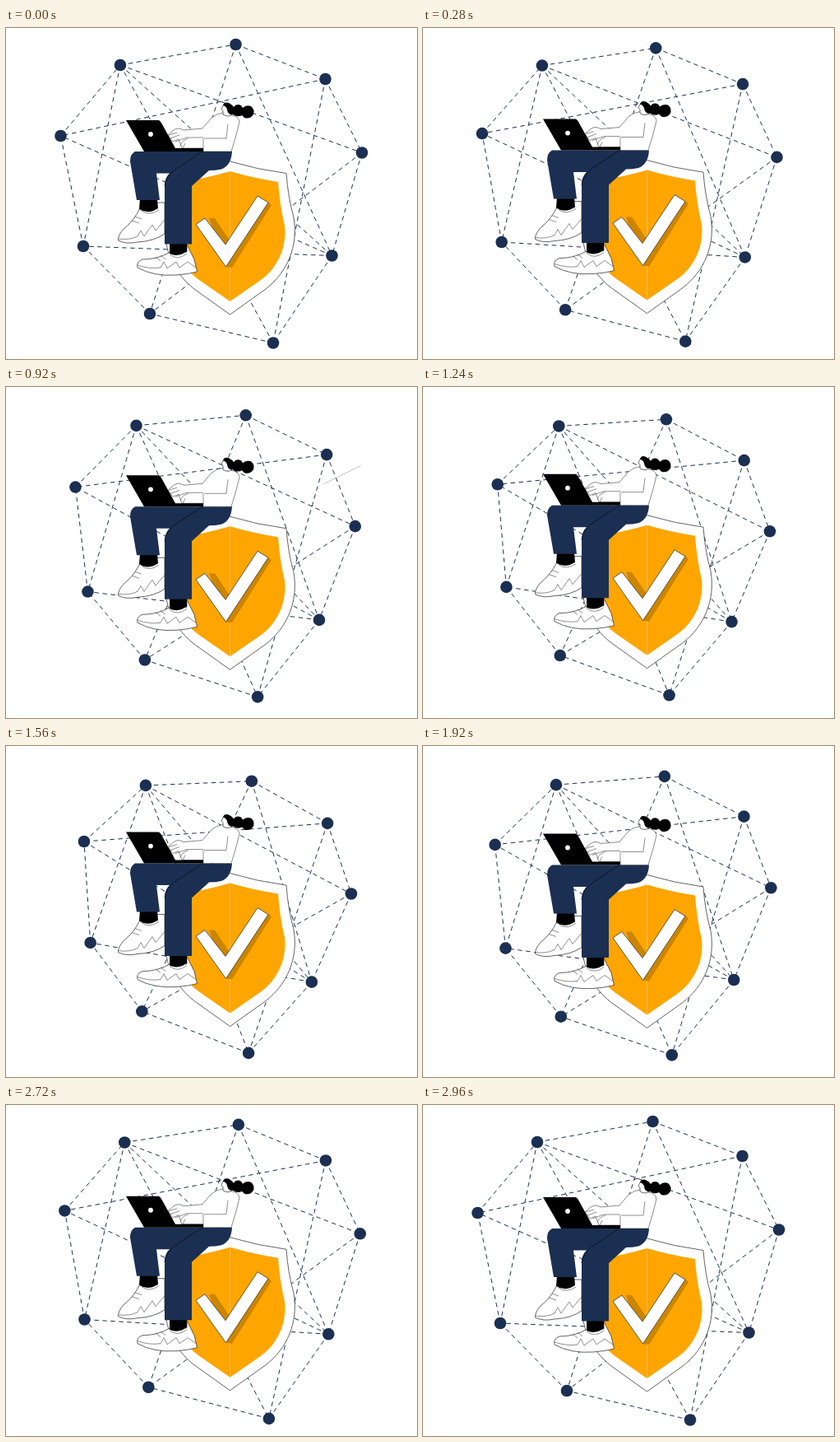
Animation, 500 px wide and 402 px high, one loop 3 s. Source, as an HTML page:

```html
<!DOCTYPE html>
<html lang="en">
<head>
<meta charset="utf-8">
<title>Secure network</title>
<style>
html, body { margin: 0; width: 100%; height: 100%; overflow: hidden; background: #fff; }
svg { display: block; width: 500px; height: 402px; }
.edge { stroke: #1b2f52; stroke-width: 1; stroke-dasharray: 5.5 4.5; }
.node, .navy { fill: #1b2f52; }
.ink { fill: #fff; stroke: #222; stroke-width: .7; stroke-linejoin: round; }
.line { fill: none; stroke: #444; stroke-width: .6; }
.streak { stroke: #aaa; stroke-width: .7; }
</style>
</head>
<body>
<svg viewBox="0 0 500 402">
  <g id="edges"></g>
  <g id="nodes"></g>
  <g id="streaks"></g>
  <g id="figure">
    <!-- shield -->
    <path class="ink" d="M272.500 162Q306 172 341 176.500Q343 205 350 230C356 265 342 297 316 317L272.500 348L229 317C203 297 189 265 195 230Q202 205 204 176.500Q239 172 272.500 162Z"/>
    <path fill="#ffa500" d="M272.500 174Q300 182 331 187Q333 215 339 240C342 265 331 291 310 306L272.500 332L235 306C214 291 203 265 206 240Q212 215 214 187Q245 182 272.500 174Z"/>
    <path d="M272.500 174V332" stroke="#ffc560" stroke-width=".8"/>
    <path fill="#cc8500" d="M247 231L254 231L272 258L319 211L323 215L275 291L267 290Z"/>
    <path class="ink" d="M231 238.500L242 231L267 263L306 204L319 212L267.500 290Z"/>

    <!-- far shoe and sock -->
    <path class="ink" d="M163 219Q155 235 143 244Q136 252 136.500 258Q146 263 160 260Q180 259 193 250V212H184Z"/>
    <path class="line" d="M137 256Q150 258 160 253L164 246L168 253L178 239L182 246L193 233M157 229L165 232M153 234L162 237M165 222Q174 229 186 221"/>
    <path d="M163 207H184L185 219Q173 227 162 220Z"/>

    <!-- near shoe and sock -->
    <path class="ink" d="M198 273Q184 281 166 281Q158 284 160 291Q180 302 207 300Q222 299 232.500 296L229 281L220 263V272Z"/>
    <path class="line" d="M160 288Q175 293 188 291L192 284L196 292L207 284L211 291L221 284L231 291M182 278L188 283M188 276L194 281M199 275Q209 283 220 274"/>
    <path d="M199 260H220V271Q210 279 199 274Z"/>

    <!-- trousers -->
    <path class="navy" d="M157 150H275Q274 167 262 171.500Q255 173 247 173L226 192V262.500H193V189Q194 181 199 176.500H183L187 209H159L151 162Q151 153 157 150Z"/>
    <path d="M239 150L207 171Q195 179 193 192" fill="none" stroke="#0b1527" stroke-width="1"/>

    <!-- torso -->
    <path class="ink" stroke-opacity=".75" d="M264 103Q256 104 250 109L239 122L216 124Q210 120 204 124L197 130L203 138L210 135L214 146L240 146V150H274Q280 132 284 114Q283 107 274 106Z"/>
    <path class="line" d="M241 134H268L270 117M240 134V146M240 133H220L206 138M198 130L208 127M200 134L211 130M212 143Q214 136 222 134M215 146L218 140"/>

    <!-- laptop -->
    <path d="M146 112H186Q188 113 190 117L206 146H240V150H168Z"/>
    <circle cx="176" cy="129" r="2.900" fill="#fff"/>

    <!-- head -->
    <path class="ink" d="M266 91L262 98L264 101V105Q270 109 275 105L273 94Z"/>
    <path d="M264 94Q266 89 271 91Q275 93 277 96Q280 91 286 94L288 97Q292 93 298 95Q303 99 301 105Q297 111 290 109L287 106Q282 109 276 105Q270 106 269 99Q268 95 264 94Z"/>
  </g>
</svg>
<script>
const LOOP = 3000, FRAME = 40, PEAK = 1510, END = 2960;

// x, y at rest, then the full travel
const nodes = {
  A: [139, 45, 32, 3],
  B: [279.5, 20, 20, 23.5],
  C: [388.5, 62, 2.7, 33],
  D: [433, 151.5, -13.5, 29],
  E: [396.5, 276.5, -25.5, 10.5],
  F: [325, 382.5, -31, -10],
  G: [175, 347, -10, -25.5],
  H: [94, 265, 9, -27],
  I: [66.5, 131, 29.5, -15.5]
};
const links = 'AB BC CD DE EF FG GH HI IA AH AD AE AF BE BG CF CI DG EH EI'.split(' ');

// start point, end point, begin and finish times
const streaks = [
  [120, 8, 12, 54.5, 320, 650],
  [472, 75.5, 380, 121, 720, 1040]
];

function add(parent, tag, className) {
  const el = document.createElementNS('http://www.w3.org/2000/svg', tag);
  el.setAttribute('class', className);
  return document.getElementById(parent).appendChild(el);
}
function set(el, attrs) {
  for (const key in attrs) el.setAttribute(key, attrs[key]);
}
const clamp = v => Math.max(0, Math.min(1, v));
const mix = (a, b, k) => a + (b - a) * k;

const lines = links.map(() => add('edges', 'line', 'edge'));
const dots = Object.keys(nodes).map(() => add('nodes', 'circle', 'node'));
const trails = streaks.map(() => add('streaks', 'line', 'streak'));
const figure = document.getElementById('figure');

function draw(time) {
  const t = Math.floor((time % LOOP) / FRAME) * FRAME;
  const p = t < PEAK ? t / PEAK : (END - t) / (END - PEAK);
  const at = name => {
    const [x, y, dx, dy] = nodes[name];
    return [x + dx * p, y + dy * p];
  };

  links.forEach((link, i) => {
    const [x1, y1] = at(link[0]), [x2, y2] = at(link[1]);
    set(lines[i], { x1, y1, x2, y2 });
  });
  Object.keys(nodes).forEach((name, i) => {
    const [cx, cy] = at(name);
    set(dots[i], { cx, cy, r: 7.3 });
  });
  streaks.forEach(([x1, y1, x2, y2, begin, finish], i) => {
    const k = (t - begin) / (finish - begin);
    const head = clamp(k * 1.5), tail = clamp(k * 1.5 - 0.5);
    set(trails[i], {
      x1: mix(x1, x2, tail), y1: mix(y1, y2, tail),
      x2: mix(x1, x2, head), y2: mix(y1, y2, head),
      visibility: head > tail ? 'visible' : 'hidden'
    });
  });
  set(figure, { transform: `translate(0 ${-7.7 * p})` });
}

const start = performance.now();
function tick() {
  draw(performance.now() - start);
  requestAnimationFrame(tick);
}
draw(0);
requestAnimationFrame(tick);
</script>
</body>
</html>
```
